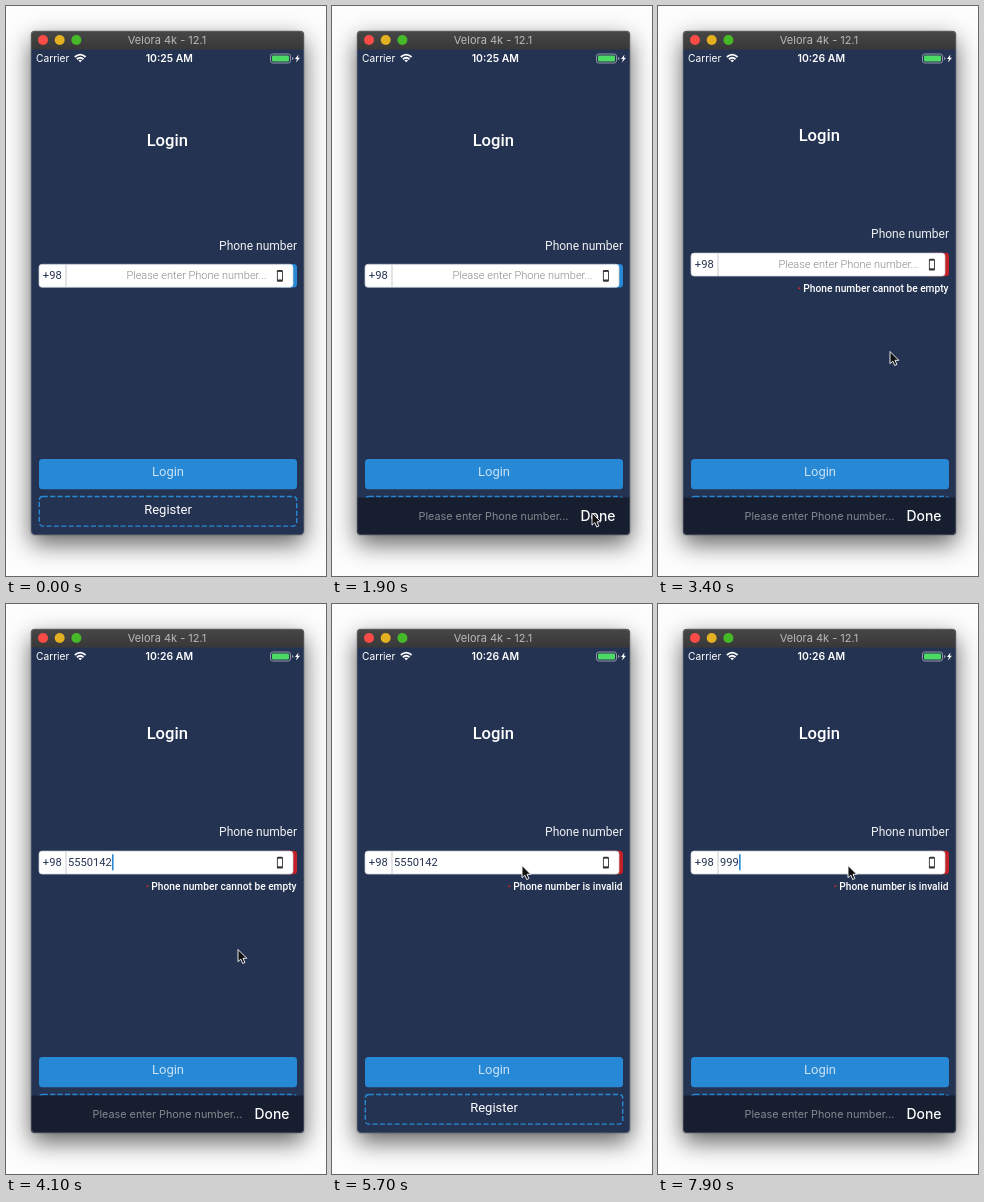
Write an HTML page that moves like this. It is 320 by 570 pixels and loops after 8 s.

```html
<!DOCTYPE html>
<html lang="en">
<head>
<meta charset="utf-8">
<title>Login form</title>
<style>
  html, body { margin: 0; width: 100%; height: 100%; overflow: hidden; background: #fdfdfd; }
  .window { position: absolute; left: 25px; top: 25px; width: 273px; height: 504px; border-radius: 5px 5px 3px 3px;
    box-shadow: 0 9px 24px rgba(0,0,0,.62), 0 0 2px rgba(0,0,0,.4); }
  svg { position: absolute; left: 0; top: 0; display: block; }
  text { font: 400 12px Roboto, sans-serif; fill: #fff; white-space: pre; }
  .sys { font-family: Inter, sans-serif; }
  .mid { text-anchor: middle; }
  .end { text-anchor: end; }
</style>
</head>
<body>
<div class="window"></div>
<svg width="320" height="570" viewBox="0 0 320 570">
  <defs>
    <clipPath id="frame"><rect x="25" y="25" width="273" height="504" rx="4"/></clipPath>
    <linearGradient id="chrome" x2="0" y2="1">
      <stop stop-color="#484747"/><stop offset="1" stop-color="#383838"/>
    </linearGradient>
  </defs>
  <g clip-path="url(#frame)">
    <rect x="25" y="25" width="273" height="504" fill="#253352"/>
    <rect x="25" y="25" width="273" height="18.5" fill="url(#chrome)"/>
    <circle cx="37" cy="34" r="5" fill="#fb4b47"/>
    <circle cx="53.7" cy="34" r="5" fill="#e2b021"/>
    <circle cx="70.4" cy="34" r="5" fill="#46b929"/>
    <text class="sys mid" x="161" y="38" style="font-size:11px;fill:#b9b9b9">Velora 4k - 12.1</text>

    <text class="sys" x="30" y="56" style="font-size:10.2px">Carrier</text>
    <g fill="none" stroke="#fff" stroke-width="1.8">
      <path d="M68.8 51Q74.2 46.3 79.6 51M70.9 53.2Q74.2 50.3 77.5 53.2"/>
      <path d="M72.4 54.4Q74.2 53 76 54.4L74.2 56.3Z" fill="#fff" stroke="none"/>
    </g>
    <text id="clock" class="sys mid" x="163.3" y="56" style="font-size:10.4px;font-weight:600"></text>
    <rect x="264.5" y="48" width="20" height="9" rx="2.2" fill="none" stroke="#929aa8"/>
    <rect x="266" y="49.5" width="17" height="6" rx="1" fill="#4cd964"/>
    <path d="M286 51v3q1.5-.3 1.5-1.5T286 51Z" fill="#929aa8"/>
    <path d="M292.5 48.5l-3.5 4.5h2l-1 3.5 4-4.7h-2.2Z" fill="#fff"/>

    <text id="heading" class="mid" x="161.3" style="font-size:16.6px;font-weight:500">Login</text>

    <g id="field">
      <text class="end" x="291" y="243.7" fill-opacity=".92">Phone number</text>
      <rect id="edge" x="270" y="258" width="21" height="23.5" rx="3.5"/>
      <rect x="33" y="258.3" width="254" height="23" rx="3" fill="#fff" stroke="#c9ced6" stroke-width=".7"/>
      <path d="M60 258.5v22.6" stroke="#c6c9ce"/>
      <text x="36.8" y="273" style="font-size:11.2px;fill:#253352">+98</text>
      <text id="hint" class="end" x="260.5" y="273" style="font-size:11px;font-weight:300;fill:#8a8a8a">Please enter Phone number...</text>
      <text id="value" x="62" y="273" style="font-size:11.1px;fill:#253352"></text>
      <rect id="caret" y="261.5" width="1.6" height="16" fill="#2789d5"/>
      <rect x="270.9" y="264" width="6" height="11.8" rx="1.2" fill="#333"/>
      <rect x="271.8" y="265.9" width="4.2" height="7.6" fill="#fff"/>
    </g>
    <g id="error">
      <circle id="dot" cy="282.3" r="1" fill="#d32626"/>
      <text id="message" class="end" x="290.6" y="286" style="font-size:10.2px;font-weight:500"></text>
    </g>

    <rect x="33" y="453" width="258" height="30.3" rx="3.5" fill="#2789d5"/>
    <text class="mid" x="162" y="470.3" style="font-size:13px;fill:#c9e1f5">Login</text>
    <rect x="33.3" y="490.5" width="257.4" height="29.6" rx="3.5" fill="none" stroke="#2789d5" stroke-width="1.4" stroke-dasharray="5 2.4"/>
    <text class="mid" x="162" y="507.7" style="font-size:13px">Register</text>

    <g id="bar">
      <rect x="25" y="491.5" width="273" height="40" fill="#161e30"/>
      <text class="sys mid" x="161.5" y="514" style="font-size:10.8px;fill:#85888f">Please enter Phone number...</text>
      <text class="sys" x="248.6" y="515" style="font-size:13.9px;font-weight:500">Done</text>
    </g>
  </g>
  <rect x="25.3" y="25.3" width="272.4" height="503.4" rx="4" fill="none" stroke="#777c85" stroke-opacity=".65" stroke-width=".7"/>
  <path id="pointer" d="M0 0V12.2L2.8 9.6L4.7 14L6.9 13L5 8.8H8.8Z" fill="#111" stroke="#fff" stroke-width=".9"/>
</svg>
<script>
const $ = id => document.getElementById(id);
const LOOP = 8000, NUMBER = '5550142';

// [time, x, y] stops of the pointer
const path = [
  [350, 196, 380], [700, 178, 267], [1250, 178, 267], [1800, 260, 507],
  [2100, 260, 507], [2550, 219.5, 232.5], [2700, 219.5, 232.5], [2900, 226, 254],
  [3050, 226, 254], [3350, 232, 345.5], [4300, 232, 345.5], [4700, 262, 506],
  [4950, 262, 506], [5450, 190, 261.5]
];
// [start, end] of each time the input has focus
const focus = [[750, 2000], [2950, 4800], [5780, LOOP + 1000]];

const ease = (t, from, length) => {
  const p = Math.min(1, Math.max(0, (t - from) / length));
  return p * p * (3 - 2 * p);
};
const show = (id, on) => $(id).setAttribute('visibility', on ? 'visible' : 'hidden');
const shift = (id, x, y) => $(id).setAttribute('transform', `translate(${x} ${y})`);
const steps = (t, from, gap) => Math.max(0, Math.floor((t - from) / gap) + 1);

function typed(t) {
  if (t < 6400) return NUMBER.slice(0, steps(t, 3450, 85));
  if (t < 7300) return NUMBER.slice(0, Math.max(t < 7000 ? 3 : 0, 7 - steps(t, 6400, 100)));
  return '9'.repeat(Math.min(3, steps(t, 7300, 150)));
}

function pointerAt(t) {
  const next = path.findIndex(p => p[0] > t);
  if (next < 0) return path[path.length - 1].slice(1);
  const [t0, x0, y0] = path[Math.max(0, next - 1)], [t1, x1, y1] = path[next];
  const k = ease(t, t0, t1 - t0);
  return [x0 + (x1 - x0) * k, y0 + (y1 - y0) * k];
}

function draw(t) {
  const failed = t >= 2050, invalid = t >= 4850;
  const moved = ease(t, 2050, 200);
  const text = typed(t);
  const focused = focus.some(([a, b]) => t >= a && t < b);
  const raised = focus.reduce((sum, [a, b]) => sum + ease(t, a, 280) - ease(t, b, 280), 0);

  $('clock').textContent = t < 3000 ? '10:25 AM' : '10:26 AM';
  $('heading').setAttribute('y', 140 - 5.5 * moved);
  shift('field', 0, -11.2 * moved);
  $('edge').setAttribute('fill', failed ? '#c32127' : '#2789d5');

  $('value').textContent = text;
  show('hint', !text);
  show('caret', focused && text);
  $('caret').setAttribute('x', 62.3 + $('value').getComputedTextLength());

  $('message').textContent = 'Phone number ' + (invalid ? 'is invalid' : 'cannot be empty');
  $('dot').setAttribute('cx', 290.6 - $('message').getComputedTextLength() - 4);
  show('error', failed);
  $('error').setAttribute('opacity', moved);

  shift('bar', 0, 39 * (1 - raised));
  show('pointer', t >= path[0][0]);
  shift('pointer', ...pointerAt(t));
}

const start = performance.now();
function tick() {
  draw((performance.now() - start) % LOOP);
  requestAnimationFrame(tick);
}
tick();
</script>
</body>
</html>
```
